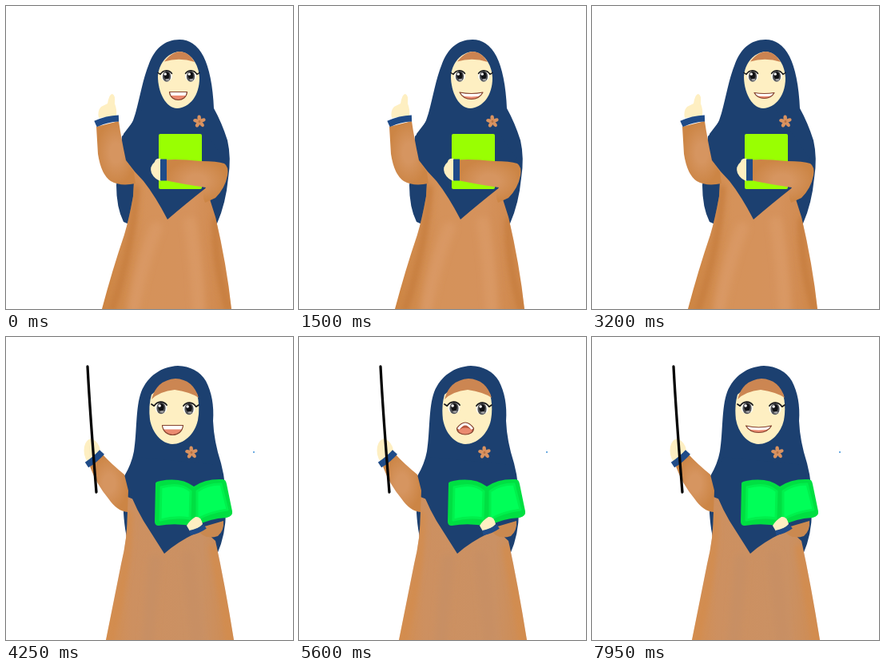
Animation of 359x379 px, one loop 8000 ms. Source, as an HTML page:

```html
<!DOCTYPE html>
<html lang="en">
<head>
<meta charset="utf-8">
<title>Teacher</title>
<style>
  html, body { margin: 0; width: 100%; height: 100%; overflow: hidden; background: #fff; }
  svg { display: block; width: 100vw; height: 100vh; }
  .hijab { fill: #1c4070; }
  .cuff { fill: none; stroke: #1f4b88; stroke-width: 8; }
  .skin { fill: #feefc2; }
  .fold { fill: none; stroke-linecap: round; filter: url(#soft); }
  .lash { fill: none; stroke: #15161a; stroke-linecap: round; stroke-linejoin: round; }
</style>
</head>
<body>
<svg viewBox="0 0 359 379">
  <defs>
    <filter id="soft" x="-50%" y="-50%" width="200%" height="200%"><feGaussianBlur stdDeviation="3.5"/></filter>
    <linearGradient id="dressA"><stop offset="0" stop-color="#cd8543"/><stop offset=".35" stop-color="#d5925a"/><stop offset=".7" stop-color="#d5925c"/><stop offset="1" stop-color="#ce8648"/></linearGradient>
    <linearGradient id="dressB"><stop offset="0" stop-color="#d48d4e"/><stop offset=".2" stop-color="#cd9060"/><stop offset=".75" stop-color="#ca9164"/><stop offset="1" stop-color="#d08b50"/></linearGradient>
    <radialGradient id="sleeve"><stop offset=".3" stop-color="#d69560"/><stop offset="1" stop-color="#cc8545"/></radialGradient>
    <clipPath id="clipA"><path id="bodyA" d="M150 192L160 219L159 238Q154 266 148 286Q133 330 120 379H282Q276 323 262 264L250 226L202 240Z"/></clipPath>
    <clipPath id="clipB"><path id="bodyB" d="M152 200V218Q152 252 144 284L125 379H285Q274 310 262 255L240 235Z"/></clipPath>
    <g id="flower"></g>
    <g id="eye">
      <ellipse rx="7" ry="6.5" fill="#fffdf5"/>
      <ellipse rx="5.2" ry="6.8" fill="#505257"/>
      <ellipse cy="-1" rx="3.4" ry="4.4" fill="#101114"/>
      <circle cx="-1.7" cy="-2.8" r="1.6" fill="#fff"/>
      <ellipse cx="1" cy="4.2" rx="2.3" ry="1.2" fill="#a5a5a8"/>
    </g>
    <path id="lid" class="lash" stroke-width="1.5" d="M-11-4.5L-8-2.5Q-5-7-.5-7.2Q4-7 6.5-3.5"/>
    <path id="shut" class="lash" stroke-width="1.6" d="M-10-1L-7 0Q0 5 7 0"/>
  </defs>

  <g id="poseA">
    <path class="hijab" d="M217 42C198 42 186 54 179 72C171 92 168 112 162 134Q157 153 145 163L138 224Q138 252 147 270L154 273L264 272Q275 247 278 215Q282 190 277 168Q270 146 260 128Q258 85 247 63Q236 42 217 42Z"/>
    <use href="#bodyA" fill="url(#dressA)"/>
    <g clip-path="url(#clipA)">
      <path class="fold" stroke="#c67d3d" stroke-width="7" d="M163 228Q159 300 133 379M262 268Q260 320 278 379"/>
      <path class="fold" stroke="#d99863" stroke-width="16" d="M188 278Q170 320 160 379M230 272Q238 320 241 379"/>
    </g>
    <path class="hijab" d="M147 160L150 193Q160 207 172 219Q187 238 202 267Q224 248 252 226L272 190L230 130L170 130Z"/>
    <path d="M113 151L141 144Q144 165 150 193L160 208L162 222Q143 226 131 219Q119 211 115 185Z" fill="url(#sleeve)"/>
    <path class="skin" d="M116 140Q114 131 119 126L127 122Q129 110 133 110Q137 111 136 122Q139 130 138 137Z"/>
    <path class="cuff" d="M112 147.5Q126 141 141 140.5"/>
    <path class="skin" d="M217 57C203 58 191 71 190 88C190 108 200 128 214 128C230 127 242 112 242 90C241 72 231 58 217 57Z"/>
    <path d="M217 57C209 58 203 63 198 69.5Q217 64 236 70C231 62 225 57 217 57Z" fill="#cc8351"/>
    <use href="#flower" x="242" y="144.5"/>
    <rect x="191" y="160" width="54" height="69" rx="2" fill="#99ff02"/>
    <path d="M199 192.5Q215 191 244 194Q264 194 273 197Q279 201 277 212Q274 228 262 240L249 246Q244 237 250 227Q222 223 199 218Z" fill="url(#sleeve)"/>
    <path class="skin" d="M194 191Q187 190 186 195Q179 201 182 209Q186 217 194 219Z"/>
    <path class="cuff" d="M197 191.5V218.5"/>
    <g class="eyes"><use href="#eye" x="201" y="88"/><use href="#eye" x="231" y="88"/></g>
    <g class="lids"><use href="#lid" x="201" y="88"/><use href="#lid" transform="translate(231 88) scale(-1 1)"/></g>
    <g class="closed"><use href="#shut" x="201" y="88"/><use href="#shut" transform="translate(231 88) scale(-1 1)"/></g>
  </g>

  <g id="poseB">
    <path class="hijab" d="M215 36C194 37 177 49 169 69C162 88 164 119 160 143Q157 159 148 174L147 220Q149 251 156 265L264 272Q275 247 275 218Q276 184 269 158Q260 130 259 105Q261 76 250 55Q239 37 215 36Z"/>
    <use href="#bodyB" fill="url(#dressB)"/>
    <g clip-path="url(#clipB)">
      <path class="fold" stroke="#d38c4d" stroke-width="8" d="M154 222Q154 290 130 379M259 264L280 379"/>
      <path class="fold" stroke="#c88f63" stroke-width="16" d="M186 280L178 379M228 275L239 379"/>
    </g>
    <path class="hijab" d="M149 174Q156 203 172 230L198 271Q213 257 240 244L268 225L266 160L165 150Z"/>
    <path d="M105 162L121 147Q132 159 148 172L153 192L152 219Q139 218 128 202Q113 184 105 162Z" fill="url(#sleeve)"/>
    <path class="skin" d="M102 156Q96 148 98 137Q100 128 107 127Q117 132 118 142Z"/>
    <path class="cuff" d="M101 160Q112 153 120 144" stroke-width="7"/>
    <path d="M102 37Q105 94 113 194" fill="none" stroke="#050505" stroke-width="3.3" stroke-linecap="round"/>
    <path class="skin" d="M182 72Q211 45 239 71Q243 88 240 104C236 122 222 134 208 134C194 133 183 120 180 103Q178 86 182 72Z"/>
    <path d="M182 78Q188 54 212 52Q234 53 241 76Q231 69 211 66Q192 68 182 78Z" fill="#cc8652"/>
    <use href="#flower" x="232" y="144.5"/>
    <path d="M238 240L272 230Q273 242 265 249Q253 253 245 247Z" fill="#ca8950"/>
    <path d="M187 184Q186 181 193 180Q219 175 235 187Q249 177 271 178Q275 178 276 184L283 218Q284 224 276 226Q254 227 236 237Q213 232 191 236Q186 236 186 231Z" fill="#00df42"/>
    <path d="M194 188Q218 181 231 193L230 227Q212 224 193 229ZM239 193Q251 184 269 184L277 216Q255 219 239 228Z" fill="#00ff58" stroke="#00f04c" stroke-width="3" stroke-linejoin="round"/>
    <path class="skin" d="M226 236Q230 229 237 225Q244 224 246 234Q241 240 230 243Z"/>
    <path class="cuff" d="M230 245Q241 243 249 237" style="stroke-width:6"/>
    <circle cx="310" cy="144" r="1" fill="#3c91d8"/>
    <g class="eyes"><use href="#eye" transform="translate(194 89) scale(1.08)"/><use href="#eye" transform="translate(229 90) scale(1.08)"/></g>
    <g class="lids"><use href="#lid" transform="translate(194 89) scale(1.1)"/><use href="#lid" transform="translate(229 90) scale(-1.1 1.1)"/></g>
    <g class="closed"><use href="#shut" transform="translate(194 89) scale(1.1)"/><use href="#shut" transform="translate(229 90) scale(-1.1 1.1)"/></g>
  </g>

  <clipPath id="mouthClip"><path id="mouthShape"/></clipPath>
  <g clip-path="url(#mouthClip)">
    <rect x="185" y="95" width="55" height="35" fill="#b4553c"/>
    <ellipse id="tongue" fill="#ea8a70"/>
    <path id="teeth" fill="none" stroke="#fff"/>
  </g>
  <path id="lips" fill="none" stroke="#84432f" stroke-width="1.2" stroke-linejoin="round"/>
</svg>
<script>
const LOOP = 8000, STEP = 50, SWITCH = 3850;
const BLINKS = [1720, 3450, 5130, 6880], BLINK_HALF = 90;
const $ = id => document.getElementById(id);

// centre x, corner y, half width, upper lip sag, depth, teeth stroke, corner fullness
const SHAPES = {
  A: { open: [215.5, 107.5, 11, 0, 10, 9, .9], smile: [215.5, 108, 14.5, 3, 8.5, 8, .6],
       slim: [215.5, 108.5, 12.5, 2, 7, 7, .6], round: [215, 110, 9, -5, 8, 5, 1] },
  B: { open: [208.5, 110.5, 13, 0, 12, 10, .9], smile: [208.5, 111, 16, 4, 8.5, 7, .6],
       slim: [208.5, 111.5, 14, 3, 7, 7, .6], round: [208, 114, 10.5, -14, 8, 7, 1] }
};
const TALK = [
  [0, 'open'], [300, 'smile'], [600, 'slim'], [900, 'open'], [1200, 'slim'], [1500, 'smile'],
  [1850, 'open'], [2200, 'smile'], [2500, 'open'], [2850, 'smile'], [3200, 'slim'], [3550, 'open'],
  [3850, 'smile'], [4200, 'open'], [4300, 'open'], [4650, 'round'], [4950, 'smile'], [5250, 'open'],
  [5550, 'round'], [5650, 'round'], [6000, 'smile'], [6400, 'open'], [6750, 'smile'], [7150, 'round'],
  [7600, 'open'], [7700, 'open'], [7950, 'smile'], [8000, 'smile']
];

for (let i = 0; i < 5; i++) {
  $('flower').innerHTML += `<ellipse cy="-4.4" rx="2.3" ry="3.6" fill="#d99260" transform="rotate(${i * 72 - 4})"/>`;
}
$('flower').innerHTML += '<circle r="1.4" fill="#b97343"/>';

function mouthAt(t, shapes) {
  const next = Math.max(1, TALK.findIndex(([at]) => at > t));
  const [t0, from] = TALK[next - 1], [t1, to] = TALK[next];
  const k = (t - t0) / (t1 - t0);
  return shapes[from].map((v, i) => v + (shapes[to][i] - v) * k);
}

function drawMouth([x, y, w, sag, depth, teeth, full]) {
  const upper = `M${x - w} ${y}Q${x} ${y + sag} ${x + w} ${y}`;
  const low = y + depth * 4 / 3;
  const shape = `${upper}C${x + w * full} ${low} ${x - w * full} ${low} ${x - w} ${y}Z`;
  $('mouthShape').setAttribute('d', shape);
  $('lips').setAttribute('d', shape);
  $('teeth').setAttribute('d', upper);
  $('teeth').setAttribute('stroke-width', teeth);
  const tongue = { cx: x, cy: y + depth * .7, rx: w * .9, ry: depth * .75 };
  for (const key in tongue) $('tongue').setAttribute(key, tongue[key]);
}

function show(nodes, on) {
  nodes.forEach(node => { node.style.display = on ? '' : 'none'; });
}

function render(now) {
  const t = Math.floor((now % LOOP) / STEP) * STEP;
  const pose = t < SWITCH ? 'A' : 'B';
  const shut = BLINKS.some(at => Math.abs(t - at) < BLINK_HALF);
  show([$('poseA')], pose === 'A');
  show([$('poseB')], pose === 'B');
  show(document.querySelectorAll('.eyes, .lids'), !shut);
  show(document.querySelectorAll('.closed'), shut);
  drawMouth(mouthAt(t, SHAPES[pose]));
}

const start = performance.now();
function tick() {
  render(performance.now() - start);
  requestAnimationFrame(tick);
}
tick();
</script>
</body>
</html>
```
